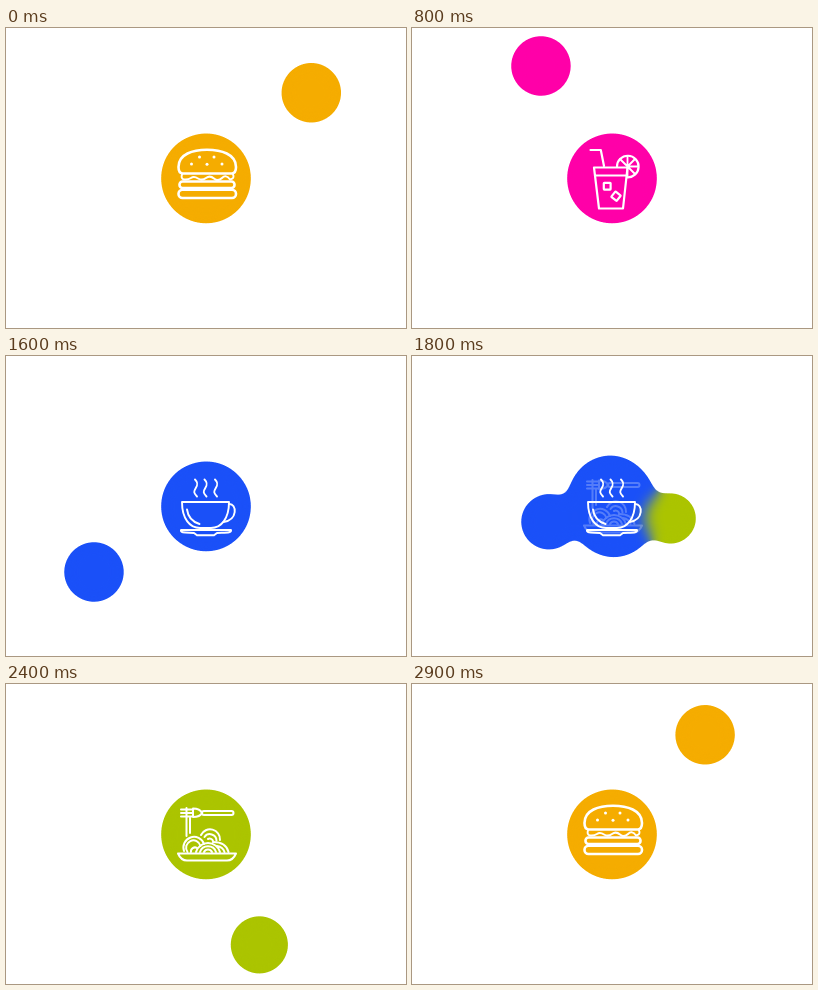
An HTML page for the animation above (3000 ms loop, 400 by 300 pixels).

```html
<!DOCTYPE html>
<html lang="en">
<head>
<meta charset="utf-8">
<title>Food loader</title>
<style>
  html, body { margin: 0; width: 100%; height: 100%; overflow: hidden; background: #fff; }
  svg { display: block; width: 400px; height: 300px; }
  .icon { fill: none; stroke: #fff; stroke-width: 2.2; stroke-linecap: round; stroke-linejoin: round; }
  .dot { fill: #fff; stroke: none; }
</style>
</head>
<body>
<svg viewBox="0 0 400 300">
  <defs>
    <linearGradient id="tint" gradientUnits="userSpaceOnUse">
      <stop offset="0"/><stop offset="1"/>
    </linearGradient>
    <filter id="goo" filterUnits="userSpaceOnUse" x="0" y="0" width="400" height="300" color-interpolation-filters="sRGB">
      <feGaussianBlur stdDeviation="7"/>
      <feColorMatrix values="1 0 0 0 0  0 1 0 0 0  0 0 1 0 0  0 0 0 18 -8.5"/>
    </filter>
  </defs>

  <g filter="url(#goo)" fill="url(#tint)">
    <path id="main"/>
    <circle id="inner"/>
    <circle id="outer"/>
  </g>

  <g class="icon" style="stroke-width:2.6">
    <path d="M176.500 145.500Q172.500 145 172.500 139C172.500 126 187 121.800 201 121.800S230 126 230 139Q230 145 226 145.500Z"/>
    <path d="M176 146.500q-1.500 4 2 5q4 .5 7-1.500t7 .5t8-.5t8 .5t8-.5t8 1.500q5-1 3-5" stroke-width="2"/>
    <rect x="173.500" y="153.500" width="55" height="6.500" rx="3"/>
    <rect x="172.500" y="161.800" width="57.500" height="8.200" rx="4"/>
    <g class="dot">
      <circle cx="193.500" cy="129" r="1.500"/><circle cx="208" cy="129" r="1.500"/>
      <circle cx="185.500" cy="136" r="1.500"/><circle cx="201" cy="136.300" r="1.500"/><circle cx="216" cy="136" r="1.500"/>
    </g>
  </g>

  <g class="icon">
    <path d="M178.500 122H188.800L192 138"/>
    <path d="M182 139.500H215.500L211 180.500H187Z M183 147.500H214.500"/>
    <path d="M205 138.500A10.800 10.800 0 1 1 215 149.300"/>
    <path d="M215.500 138.500V128.500M215.500 138.500H226M215.500 138.500L208 131M215.500 138.500L223 131M215.500 138.500L223 146M215.500 138.500V148" stroke-width="1.800"/>
    <rect x="191.800" y="154.800" width="6.800" height="6.800" rx=".5"/>
    <rect x="200.600" y="164.800" width="6.800" height="6.800" rx=".5" transform="rotate(38 204 168.200)"/>
  </g>

  <g class="icon" style="stroke-width:1.900">
    <path d="M176 146H223C223 163 215 172 205 172H194C184 172 176 163 176 146Z"/>
    <path d="M223 148C231 147.500 232 164 217.500 166"/>
    <path d="M181 153.500C182 161 187 166 193.500 168"/>
    <path d="M175 174H225C226 177 220 176.500 211 177L208 179.300H191L188 177C180 176.500 174 177 175 174Z"/>
    <path d="M189 123.500c3 3 3 5 .8 8.500s-2.300 5 1.200 8.500m7.500-17c3 3 3 5 .8 8.500s-2.300 5 1.200 8.500m8.500-17c3 3 3 5 .8 8.500s-2.300 5 1.200 8.500"/>
  </g>

  <g class="icon" style="stroke-width:2">
    <path d="M175 125.500H187M175 129H187M175 132.500H187M180.500 124V152M184 134V149M187 124.500q7 0 9 4.500q-2 4-9 4Z"/>
    <rect x="196" y="127" width="31.500" height="4" rx="2"/>
    <path d="M178 167a10.500 10.500 0 1 1 20-7M181.500 168a7.300 7.300 0 1 1 13-6M185 168a4 4 0 0 1 6-4"/>
    <path d="M195 151a10 10 0 0 1 19 5M198.500 153a6.600 6.600 0 0 1 12 3.500M202 155a3.500 3.500 0 0 1 5 2"/>
    <path d="M190 168a12.500 12.500 0 0 1 24 0M194 168a8.500 8.500 0 0 1 16 0M198 168a4.500 4.500 0 0 1 8 0M207 158q13 0 15.500 10M211 162q6 1 7.500 6"/>
    <path d="M172 169.500H230Q227 176.500 221 176.500H181Q175 176.500 172 169.500Z"/>
  </g>
</svg>

<script>
const LOOP = 3000, PHASE = 750, STEP = 100;
const CX = 200, CY = 150;
const COLORS = ['#f5ac00', '#ff00a8', '#1a50f8', '#abc400'];

// Ball life: age in ms, distance, angle in degrees, radius
const BALL = [
  [200, 0, -88, 22], [300, 60, -78, 26], [400, 103, -68, 25.3], [500, 129, -58.7, 30],
  [550, 133.5, -56, 30.5], [650, 136, -46.8, 30.5], [750, 135.5, -39, 30.5],
  [800, 132.6, -32.4, 30.5], [850, 130, -30.5, 30.5], [900, 123, -25.7, 29.4],
  [950, 108, -22, 28.5], [1050, 65, -14, 28.5], [1150, 26, -4, 30], [1250, 5, 4, 30]
];
// Main blob: phase time, half width across the pull
const SQUASH = [[200, 45.4], [300, 51.5], [350, 50], [400, 43.5], [500, 45.4]];
// Colour sweep: phase time, edge, width
const SWEEP = [[200, -100, 60], [300, -40, 80], [400, 0, 125], [500, -45, 500], [600, 60, 900]];
const FADE_OUT = [[300, 1], [400, 0.55], [500, 0]];
const FADE_IN = [[250, 0], [400, 0.78], [500, 1]];

const $ = id => document.getElementById(id);
const icons = document.querySelectorAll('.icon');
const tint = $('tint');
const set = (el, attrs) => { for (const k in attrs) el.setAttribute(k, attrs[k]); };
const rad = deg => deg * Math.PI / 180;

function at(table, t) {
  const i = table.findIndex(row => row[0] >= t);
  if (i < 0) return table[table.length - 1].slice(1);
  if (!i) return table[0].slice(1);
  const a = table[i - 1], b = table[i], f = (t - a[0]) / (b[0] - a[0]);
  return a.slice(1).map((v, n) => v + (b[n + 1] - v) * f);
}

function placeBall(el, age, turn) {
  const [dist, angle, r] = at(BALL, age), a = rad(angle + turn);
  set(el, { cx: CX + dist * Math.cos(a), cy: CY + dist * Math.sin(a), r });
}

function draw(time) {
  const k = Math.floor(time / PHASE), p = time % PHASE, next = (k + 1) % 4;
  const axis = -10 - 90 * k, ux = Math.cos(rad(axis)), uy = Math.sin(rad(axis));

  placeBall($('inner'), p + PHASE, -90 * k);
  placeBall($('outer'), p, -90 * (k + 1));

  const [h] = at(SQUASH, p);
  set($('main'), {
    d: `M-45.4 0A45.4 ${h} 0 0 1 45.4 0A45.4 ${h} 0 0 1 -45.4 0Z`,
    transform: `translate(${CX} ${CY + 0.4}) rotate(${axis})`
  });

  const [edge, width] = at(SWEEP, p), far = edge + width;
  set(tint, { x1: CX + ux * edge, y1: CY + uy * edge, x2: CX + ux * far, y2: CY + uy * far });
  // While the ball only orbits, everything keeps the old colour
  set(tint.children[0], { 'stop-color': COLORS[p <= 200 ? k : next] });
  set(tint.children[1], { 'stop-color': COLORS[p > 600 ? next : k] });

  icons.forEach((icon, i) => {
    icon.style.opacity = i === k ? at(FADE_OUT, p)[0] : i === next ? at(FADE_IN, p)[0] : 0;
  });
}

const start = performance.now();
function tick() {
  const t = (performance.now() - start) % LOOP;
  draw(Math.floor(t / STEP) * STEP);
  requestAnimationFrame(tick);
}
tick();
</script>
</body>
</html>
```
